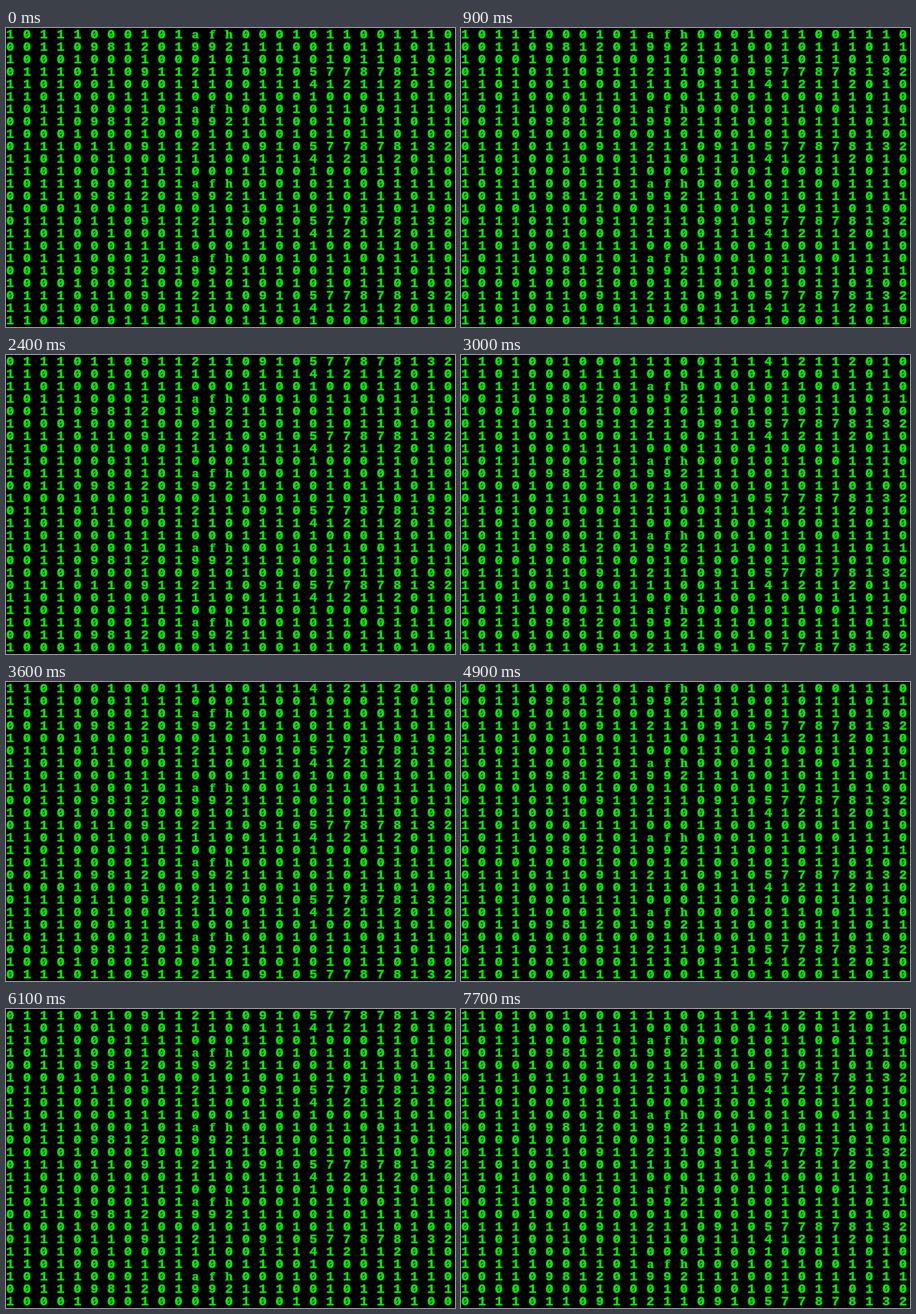
An HTML page with a canvas that plays this animation: 649 by 433 pixels, repeating every 8 s.

```html
<!DOCTYPE html>
<html lang="en">
<head>
<meta charset="utf-8">
<title>Green digits</title>
<style>
  html, body { margin: 0; width: 100%; height: 100%; overflow: hidden; background: #000; }
  canvas { display: block; }
</style>
</head>
<body>
<canvas id="stage" width="649" height="433"></canvas>
<script>
const ctx = document.getElementById('stage').getContext('2d');

const TEXT = `10111000101afh0001011001110
001109812019921110010111011
100010001000101001010110100
011101109112110910577878132
110100100011100111412112010
110100011110001100100011010`;
const LINES = TEXT.split('\n');
const COL = 24.34, ROW = 18, ROWS = 24, LOOP = 8000;

const FONTS = {
  digit: 'bold 19px "Liberation Mono", monospace',
  zero: 'bold 16px "DejaVu Sans", sans-serif',
  letter: 'bold 17px "Noto Serif", serif'
};

// Each run repeats its top lines and hold times until the next run begins.
const RUNS = [
  { from: 0, tops: '043', holds: [300] },
  { from: 2400, tops: '3404', holds: [600, 300, 300, 300] },
  { from: 3900, tops: '3040', holds: [1000, 600, 300, 300] }
];

function topAt(t) {
  const { from, tops, holds } = RUNS.filter(r => r.from <= t).pop();
  let i = 0;
  for (let end = from + holds[0]; end <= t; end += holds[i % holds.length]) i++;
  return +tops[i % tops.length];
}

function slash(x, y) {
  ctx.beginPath();
  ctx.moveTo(x - 3, y - 3);
  ctx.lineTo(x + 3, y - 9);
  ctx.lineWidth = 2;
  ctx.strokeStyle = '#00d800';
  ctx.stroke();
}

function drawChar(ch, x, y) {
  ctx.font = ch === '0' ? FONTS.zero : ch > '9' ? FONTS.letter : FONTS.digit;
  ctx.lineWidth = 1;
  ctx.strokeStyle = '#008000';
  ctx.strokeText(ch, x, y);
  ctx.fillText(ch, x, y);
  if (ch === '0') slash(x, y);
}

function draw(top) {
  ctx.fillStyle = '#000';
  ctx.fillRect(0, 0, 649, 433);
  ctx.textAlign = 'center';
  ctx.lineJoin = 'round';
  ctx.fillStyle = '#00f000';
  for (let r = 0; r < ROWS; r++) {
    const line = LINES[(top + r) % LINES.length];
    [...line].forEach((ch, c) => drawChar(ch, 6 + c * COL, 15 + r * ROW));
  }
}

let shown = -1;
const begin = performance.now();

function tick() {
  const top = topAt((performance.now() - begin) % LOOP);
  if (top !== shown) draw(shown = top);
  requestAnimationFrame(tick);
}
tick();
</script>
</body>
</html>
```
